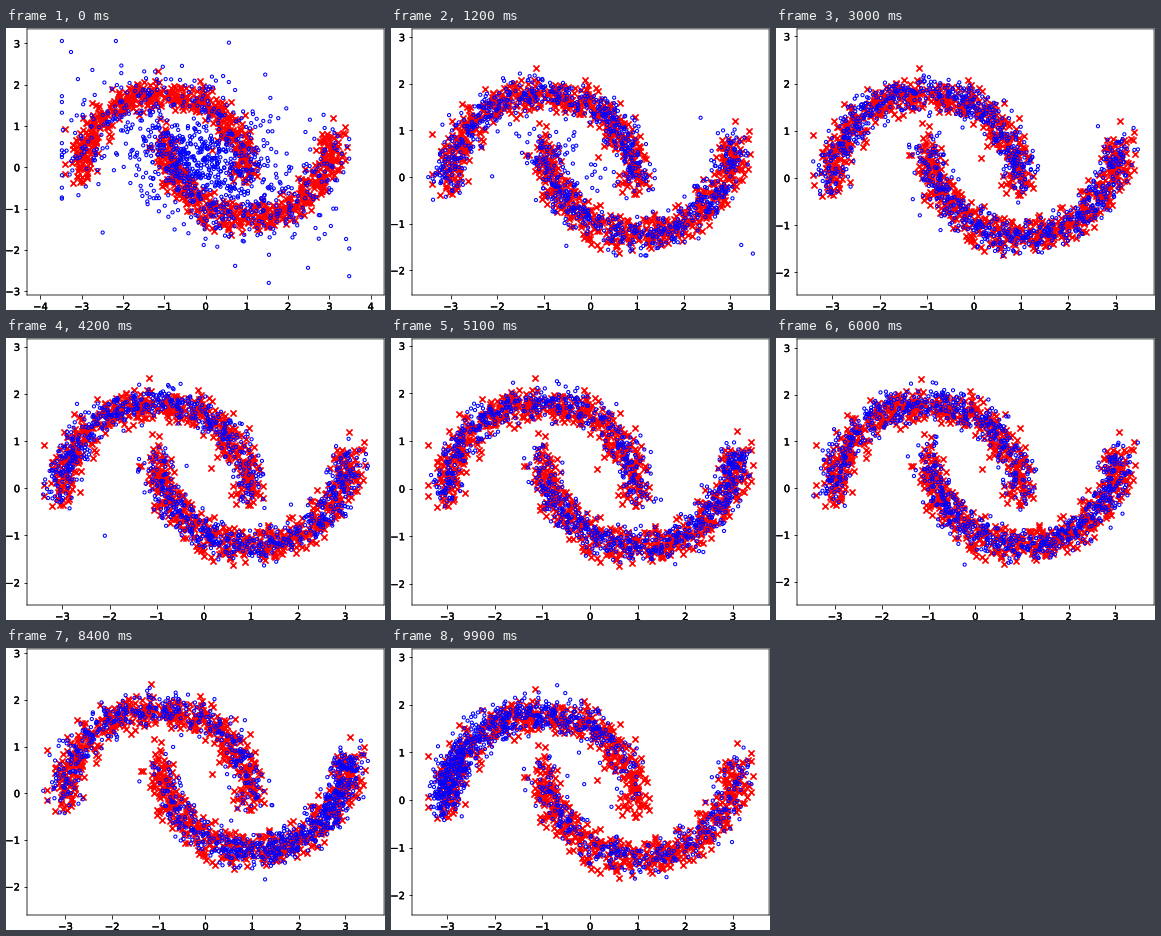
Write a matplotlib script that moves like this. It is 379x282 px and loops after 10000 ms.

```python
import matplotlib.pyplot as plt
import numpy as np
from matplotlib.animation import FuncAnimation
from matplotlib.patheffects import withStroke
from matplotlib.ticker import MultipleLocator

W, H, DPI = 379, 282, 72
BOX_W, BOX_H = 357.1, 266.1
FRAMES, STEP = 100, 100
N = 1000
SIGMA = 0.18
EDGE = 3.48   # samples saturate here horizontally
REACH = 2.93  # loose samples stay this close to the middle vertically


def moons(u, upper):
    """Points on the two arcs, u in 0..1 along each arc."""
    side = np.where(upper, 1, -1)
    x = side * (2.04 * np.cos(np.pi * u) - 1.02)
    y = side * (2.04 * np.sin(np.pi * u) - 0.51) + 0.3
    return np.column_stack([x, y])


def jitter(rng, n):
    return np.clip(rng.normal(0, 1, (n, 2)), -2.4, 2.4)


def make_data():
    rng = np.random.default_rng(7)
    u = np.tile(np.linspace(0, 1, N // 2), 2)
    pts = moons(u, np.arange(N) < N // 2) + SIGMA * jitter(rng, N)
    pts = np.clip(pts, (-3.4, -1.63), (3.42, 2.33))
    loners = [(-1.16, 2.33), (-3.4, 0.92), (0.15, 0.42), (3.42, 0.5)]
    return np.vstack([pts, loners])


def loose_cloud(rng):
    """Broad slanted cloud with a dense core."""
    a, b = rng.normal(0, 1, (2, N)) * rng.uniform(0.4, 1.5, N)
    x = 1.3 * a - 0.1
    y = np.clip(-0.35 * a + 0.8 * b, -REACH, REACH) + 0.13
    return np.column_stack([x, y])


def sample(i):
    """Generated points at step i: a loose cloud that settles on the arcs."""
    rng = np.random.default_rng(100 + i)

    # the balance between the arcs swings more as training goes on
    swing = -np.cos(2 * np.pi * (i - 84) / 30) * (i / FRAMES) ** 2
    upper = rng.random(N) < 0.5 + 0.18 * swing
    skew = np.exp(-0.7 * np.maximum(np.where(upper, swing, -swing), 0))
    u = rng.random(N) ** skew

    sigma = np.full((N, 1), SIGMA + 0.16 * np.exp(-i / 4))
    sigma[rng.random(N) < 0.008] *= 1.8
    pts = moons(u, upper) + sigma * jitter(rng, N)

    loose = rng.random(N) < 0.62 * np.exp(-i / 4.5) + 0.002
    pts[loose] = loose_cloud(rng)[loose]
    pts[:, 0] = np.clip(pts[:, 0], -EDGE, EDGE)
    return pts


def equal_limits(pts):
    """Same scale on both axes, with a 5 % margin around the points."""
    lo, hi = pts.min(axis=0), pts.max(axis=0)
    size = np.array([BOX_W, BOX_H])
    half = size * np.max(1.1 * (hi - lo) / size) / 2
    mid = (lo + hi) / 2
    return mid - half, mid + half


data = make_data()

plt.rcParams["font.family"] = "DejaVu Sans"
# soft, unsnapped lines and slightly heavier labels
plt.rcParams["path.snap"] = False
fig = plt.figure(figsize=(W / DPI, H / DPI), dpi=DPI, facecolor="white")
ax = fig.add_axes([21 / W, 15 / H, BOX_W / W, BOX_H / H])
for axis in (ax.xaxis, ax.yaxis):
    axis.set_major_locator(MultipleLocator(1))
heavy = [withStroke(linewidth=0.35, foreground="black")]

ax.scatter(*data.T, s=38, c="red", marker="x", linewidths=1.7)
dots = ax.scatter([], [], s=10, marker="o", facecolors="none",
                  edgecolors="blue", linewidths=1.05)


def draw(i):
    pts = sample(i)
    dots.set_offsets(pts)
    lo, hi = equal_limits(np.vstack([pts, data]))
    ax.set_xlim(lo[0], hi[0])
    ax.set_ylim(lo[1], hi[1])
    for label in ax.get_xticklabels() + ax.get_yticklabels():
        label.set_path_effects(heavy)
    return [dots]


anim = FuncAnimation(fig, draw, frames=FRAMES, interval=STEP,
                     repeat=True, blit=False)
plt.show()
```
